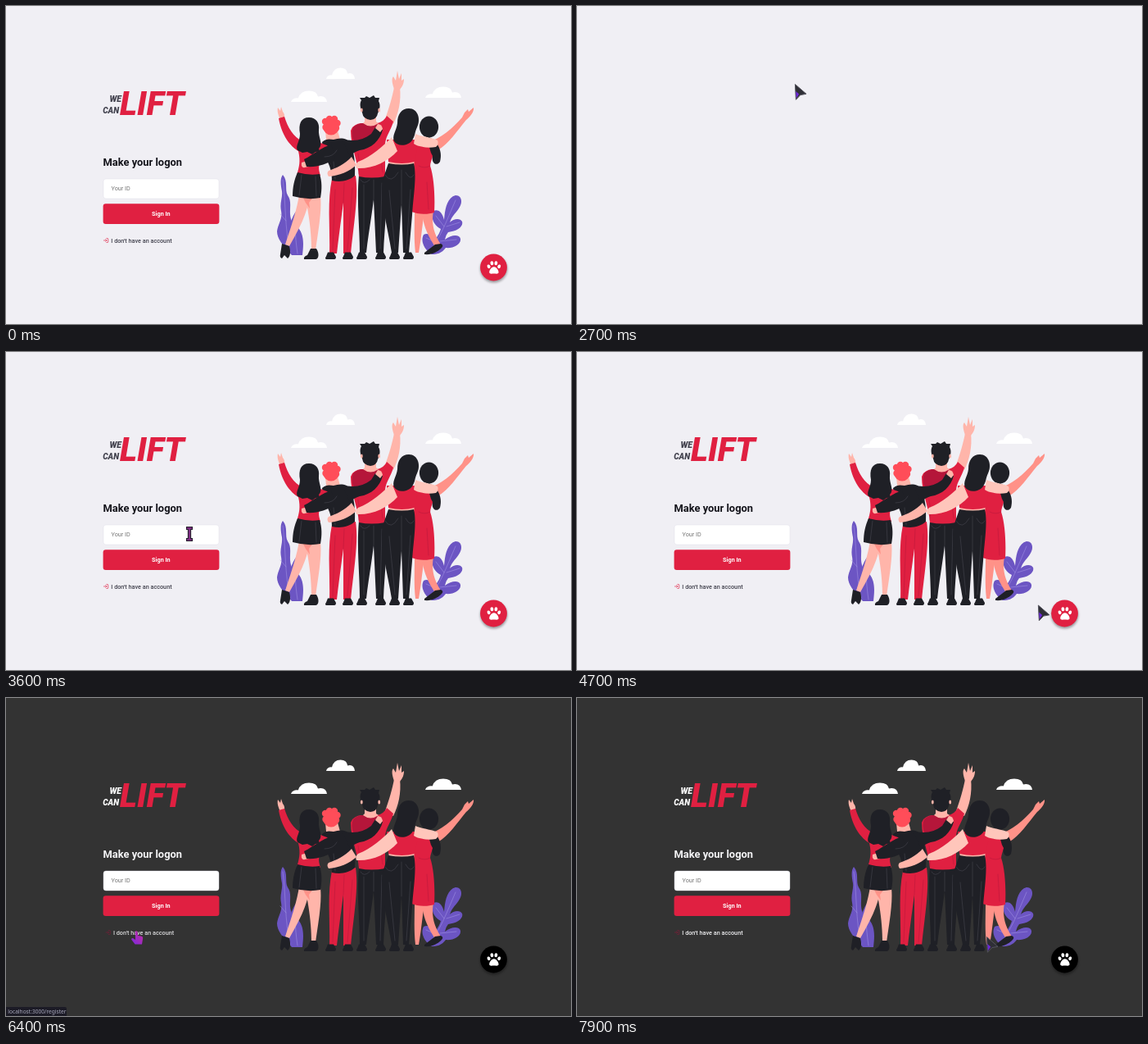
Write an HTML page that moves like this. It is 690 px wide and 388 px high and loops after 8 s.

```html
<!DOCTYPE html>
<html lang="en">
<head>
<meta charset="utf-8">
<title>Logon</title>
<style>
html, body { margin: 0; width: 100%; height: 100%; overflow: hidden; background: #f0eff4; }
svg { display: block; width: 690px; height: 388px; font-family: Roboto, "Open Sans", sans-serif; }
.bg { fill: var(--bg); }
.ink { fill: var(--ink); }
.word { fill: var(--word); }
.link { fill: var(--link); }
.icon { stroke: var(--icon); }
.paw { fill: var(--paw); }
.black { fill: #1f2026; }
.red { fill: #e02041; }
.shade { fill: #b5163a; }
.ginger { fill: #ff4d59; }
.skin { fill: #ffb5aa; }
.pale { fill: #ffc6bb; }
.tan { fill: #ff9288; }
.leaf { fill: #6c55c3; }
.white { fill: #fff; }
.line { fill: none; stroke-width: .5; stroke-linecap: round; }
</style>
</head>
<body>
<svg id="stage" viewBox="0 0 690 388">
  <defs>
    <linearGradient id="glow" x1="0" y1="1" x2="1" y2="0">
      <stop offset="0" stop-color="#7a2be0"/><stop offset="1" stop-color="#c92a9c"/>
    </linearGradient>
    <filter id="soft" x="-30%" y="-30%" width="160%" height="160%"><feGaussianBlur stdDeviation="1.8"/></filter>
  </defs>
  <rect class="bg" width="690" height="388"/>

  <g id="form">
    <g font-weight="900" font-style="italic">
      <text class="word" x="141" y="117" font-size="10.5" text-anchor="end">WE</text>
      <text class="word" x="138" y="131" font-size="10" text-anchor="end">CAN</text>
      <text class="red" x="139" y="133" font-size="40">LIFT</text>
    </g>
    <text class="ink" x="118.5" y="194.5" font-size="12.9" font-weight="700">Make your logon</text>
    <rect class="white" x="119" y="211" width="141" height="24" rx="3" stroke="#dcdce6" stroke-width=".4"/>
    <text x="128.6" y="225.3" font-size="7.25" fill="#757575">Your ID</text>
    <rect id="button" x="118.6" y="241.2" width="141.8" height="24.7" rx="3.2"/>
    <text class="white" x="189.4" y="256.2" font-size="7.25" font-weight="700" text-anchor="middle">Sign In</text>
    <g id="link">
      <path class="line icon" style="stroke-width:.65" d="M119.4 286H122.9M121.7 284.7L123 286L121.7 287.3M122.8 283.5H124Q124.7 283.5 124.7 284.2V287.8Q124.7 288.5 124 288.5H122.8"/>
      <text class="link" x="128.3" y="288.6" font-size="7.25" font-weight="500">I don't have an account</text>
    </g>
  </g>

  <g id="crowd"></g>

  <g id="pawButton">
    <circle cx="595.7" cy="321" r="16.6" opacity=".36" filter="url(#soft)"/>
    <circle class="paw" cx="595.5" cy="319" r="16.4"/>
    <g class="white">
      <ellipse cx="589.6" cy="317.8" rx="1.9" ry="2.4" transform="rotate(-22 589.6 317.8)"/>
      <ellipse cx="593.4" cy="313.8" rx="1.9" ry="2.5" transform="rotate(-8 593.4 313.8)"/>
      <ellipse cx="598.4" cy="313.8" rx="1.9" ry="2.5" transform="rotate(8 598.4 313.8)"/>
      <ellipse cx="602.2" cy="317.8" rx="1.9" ry="2.4" transform="rotate(22 602.2 317.8)"/>
      <path d="M595.9 318.2C599 318.2 601.7 322.4 601.6 324.8C601.5 327.4 598.5 326.6 595.9 326.5C593.3 326.6 590.3 327.4 590.2 324.8C590.1 322.4 592.8 318.2 595.9 318.2Z"/>
    </g>
  </g>

  <g id="status">
    <path d="M0 377H72Q74 377 74 379V388H0Z" fill="#1c1b26"/>
    <text x="2.3" y="385" font-size="6.6" fill="#a9a9bd" font-family="'Noto Sans', sans-serif">localhost:3000/register</text>
  </g>

  <g id="cursor">
    <g id="arrow">
      <path d="M.4 .5L14 12.3L6.8 13.6L1.4 19.3Z" fill="#2f2f36" stroke="#55555e" stroke-width="1" stroke-linejoin="round"/>
      <path d="M1.2 9L5.2 12.6L1.9 17.6Z" fill="#6d28d9"/>
    </g>
    <path id="beam" d="M-3.5-8.5H3.5V-5.5H1.6V5.5H3.5V8.5H-3.5V5.5H-1.6V-5.5H-3.5Z" fill="#7c2c80" stroke="#27202f" stroke-width="1.1"/>
    <path id="hand" d="M-1.2 .6C-1 -.6 1.1 -.6 1.4 .6L2.2 5.5L5.8 6C7.8 6.3 8.4 7.6 8.1 9.2L7 16H-1.4L-5.6 10.6C-6.6 9.2 -5 7.8 -3.6 8.8L-1 10.6Z" fill="url(#glow)"/>
  </g>
</svg>
<script>
const LOOP = 8000, STEP = 100;
const $ = id => document.getElementById(id);

const shape = (cls, d) => `<path class="${cls}" d="${d}"/>`;
const dot = (cls, x, y, rx, ry = rx) => `<ellipse class="${cls}" cx="${x}" cy="${y}" rx="${rx}" ry="${ry}"/>`;
const line = (color, d) => `<path class="line" stroke="${color}" d="${d}"/>`;
const shoe = (x, w = 13) =>
  shape('black', `M${x + 3} 300.5H${x + w - 3}L${x + w} 306Q${x + w} 309 ${x + w - 2} 309H${x + 1}Q${x - 1} 308 ${x + 1} 305.5Z`);
const cloud = (x, y, w) =>
  shape('white', `M${x} ${y}q${w * .04} -5 ${w * .2} -4.6q${w * .06} -9 ${w * .3} -9q${w * .22} 0 ${w * .25} 7q${w * .22} -2 ${w * .25} 6.6Z`);

const VEIN = '#a99be8', STITCH = '#4c4d57', FOLD = '#b5163a';

const plants = [
  shape('leaf', 'M347 301C338 292 331 284 331 275C332 266 338 260 336 250C334 240 338 234 337 226C335 216 335 210 338 206C345 214 340 224 344 231C350 239 345 249 348 260C354 273 350 288 349 301Z'),
  shape('leaf', 'M349 304C341 296 340 287 347 280C349 270 346 265 350 258Q353 251 356 249C360 256 354 262 357 271C365 280 363 294 362 304Z'),
  line(VEIN, 'M338 212C342 240 340 270 347 300M355 255C352 272 354 288 356 302M335 254L342 262M350 264L353 270'),
  shape('leaf', 'M520 303C510 297 506 286 510 279C515 276 521 280 525 284C528 279 530 276 531 272C523 268 518 259 522 250C529 247 533 253 535 261C536 249 538 234 549 231C557 231 558 240 553 247C549 253 544 257 542 264C547 259 555 259 557 263C559 269 551 275 540 276C537 280 537 282 536 285C545 278 554 279 555 284C556 291 546 296 537 295C532 302 526 303 520 303Z'),
  line(VEIN, 'M515 302C530 285 538 262 549 237M535 269L525 256M538 269L554 264M527 289L513 283M530 287L550 285')
];

const rightWoman = [
  shape('tan', 'M499 250L511 251C508 270 507 285 504 301H500C498 284 499 268 499 250Z'),
  shape('tan', 'M508 250L522 250C519 266 523 279 531 291L525 295C516 282 509 268 508 250Z'),
  shape('black', 'M511 301L524 291L531 290Q535 292 532 295C527 300 520 304 511 303Z'),
  shape('tan', 'M516 166C530 162 546 149 557 136L560 130L564 126L565 129L571 124C572 129 566 136 562 139C551 152 541 168 527 176Z'),
  shape('red', 'M500 160C512 162 520 163 524 168C525 178 519 186 518 195C523 210 524 234 523 252C514 255 503 254 495 251L496 190Z'),
  shape('black', 'M516 160C526 164 534 176 530 190C526 196 519 192 521 183Q516 175 516 160Z'),
  dot('black', 516.5, 147.5, 11.6, 13),
  line(FOLD, 'M518 195Q511 199 504 195M514 215L516 248')
];

const leftWoman = [
  shape('skin', 'M358 230L371 232C368 253 358 272 346 293L341 291C347 272 355 251 358 230Z'),
  shape('skin', 'M365 231L384 232C386 250 381 276 378 298H373C373 280 371 259 365 231Z'),
  shape('tan', 'M362 232H376L370 240L371 247Q365 240 362 232Z'),
  shape('black', 'M337 290L346 293C348 300 347 306 344 308L340 304L337 308Q334 307 335 303Z'),
  shape('black', 'M372 296L379 296C383 302 382 309 378 309H364Q363 306 368 304Z'),
  shape('skin', 'M335 139C332 132 331 128 332 124L335 128L336 123L338 129C341 132 340 136 340 138Z'),
  shape('red', 'M333 137L340 135C344 148 351 160 362 165L367 181C350 177 337 160 333 137Z'),
  shape('red', 'M356 164L387 168L384 190C381 196 382 200 384 207H355C358 196 360 190 357 177Z'),
  shape('black', 'M356 203Q370 207 383 205C386 214 386 224 384 234Q368 237 350 232C350 221 352 212 356 203Z'),
  line(STITCH, 'M361 206L358 231M378 208L379 232'),
];

const leftHair = shape('black', 'M370 136C379 136 383 143 382 151C381 160 388 168 382 174Q384 178 378 178L374 181L368 178L362 179L356 176C353 171 359 165 359 156C357 144 360 136 370 136Z');

const redhead = [
  shape('red', 'M398 211L427 207C431 232 424 270 421 302H412L412 240C409 262 406 284 404 302H395C396 272 392 240 398 211Z'),
  line(FOLD, 'M412 240L413 216M402 224L399 298M423 222L417 298'),
  shoe(390), shoe(411),
  shape('skin', 'M390 152H405L408 163Q398 167 391 163Z'),
  shape('black', 'M386 166C392 161 396 163 400 163C405 162 409 160 416 163C424 170 427 186 426 207C418 214 408 215 398 213C398 200 394 190 388 183Z'),
  shape('red', 'M381 166L392 170Q397 173 394 178L381 181Z'),
  shape('skin', 'M368 189L361 191Q360 198 365 197L369 196Z'),
  leftHair,
  shape('black', 'M397 169C386 172 376 181 364 187L367 196C380 197 392 193 402 186Z'),
  line(STITCH, 'M389 184Q400 184 404 176M400 190L402 211')
];
[[390, 141], [395, 138], [401, 138], [404.5, 143], [403, 149], [390.5, 148], [397, 148]]
  .forEach(([x, y], i) => redhead.push(dot('ginger', x, y, i === 6 ? 9.5 : 4.2)));

const tallMan = [
  shape('black', 'M431 206H464C467 238 462 270 461 301H452L449 236C446 260 442 282 440 301H432C432 270 428 240 431 206Z'),
  line(STITCH, 'M449 236V212M437 218L437 296M459 216L457 296M433 212Q437 219 444 212'),
  shoe(428), shoe(451),
  shape('skin', 'M463 138C468 124 472 110 474 99L481 99C483 116 479 132 473 144Z'),
  shape('skin', 'M474 101C471 93 471 88 473 86L476 91L478 79L480 89L483 82L483 91L486 89C486 96 483 99 481 102Z'),
  shape('red', 'M423 148C430 142 434 143 437 143Q445 147 453 143C459 142 463 138 465 134L473 141C470 152 464 158 463 168V208Q446 211 431 208C430 190 421 172 421 152Z'),
  shape('shade', 'M424 148C430 143 434 143 437 143Q445 149 453 143L457 148C451 158 436 165 424 164Q421 155 424 148Z'),
  shape('skin', 'M438 130H452V141L455 143Q445 150 436 143L438 141Z'),
  shape('black', 'M435 130C432 123 432 118 434 115L432 112L438 112L440 110L444 112L449 109L451 112L456 112L455 116C458 121 456 127 454 131Q453 138 445 139Q436 138 435 130Z'),
  dot('skin', 434.3, 127, 1.4, 2.6), dot('skin', 455.7, 127, 1.4, 2.6),
  line(FOLD, 'M430 180Q433 192 431 205M457 180L460 203'),
  shape('skin', 'M422 184C414 193 403 198 394 201Q391 204 394 208C407 207 419 202 428 194Z'),
  shape('black', 'M410 162C424 166 436 164 446 156L451 148L460 151C457 164 446 174 432 176Q425 178 420 183Z'),
  shape('skin', 'M451 149L454 144Q459 144 460 150L457 154Z')
];

const darkHairWoman = [
  shape('skin', 'M467 186H499L498 196H468Z'),
  shape('black', 'M467 192Q484 195 498 192C502 208 497 235 496 255L492 301H485L483 242L479 301H471C466 270 456 235 460 212Z'),
  line(STITCH, 'M483 242V200M463 206Q470 218 479 203M488 203Q494 214 498 206M468 225L475 296M494 224L489 296'),
  shoe(468), shoe(485),
  shape('red', 'M465 163H502C505 172 499 182 499 190Q484 194 467 190Z'),
  shape('pale', 'M471 160C462 170 446 184 430 190Q426 193 428 198C448 199 466 190 478 177Z'),
  shape('pale', 'M500 156C508 160 520 160 527 164Q529 169 525 172C513 174 502 171 498 168Z'),
  shape('black', 'M492 125C503 125 507 138 502 148C499 154 500 158 496 164C491 171 478 172 474 165C471 158 477 152 478 143C478 132 483 125 492 125Z')
];

$('crowd').innerHTML = [
  cloud(391, 89, 35), cloud(348, 117, 44), cloud(512, 112, 44),
  ...plants, ...rightWoman, ...leftWoman, ...redhead, ...tallMan, ...darkHairWoman
].join('');

// Pointer path: time, x, y
const PATH = [
  [300, 700, 240], [600, 600, 192], [800, 350, 160], [1000, 454, 212], [1300, 454, 212],
  [1500, 398, 172], [1900, 358, 155], [2300, 358, 155], [2700, 266, 95], [3000, 283, 90],
  [3300, 272, 58], [3600, 224, 222], [3900, 190, 251], [4200, 300, 240], [4800, 584, 314],
  [5200, 584, 314], [5700, 200, 252], [6000, 159, 284.5], [6500, 159, 284.5],
  [6700, 190, 257], [7000, 403, 270], [7900, 500, 291], [8000, 500, 291]
];

// Theme colours: light, dark
const THEME = {
  bg: [[240, 239, 244], [51, 51, 51]],
  ink: [[19, 19, 26], [245, 245, 247]],
  word: [[65, 65, 77], [255, 255, 255]],
  link: [[65, 65, 77], [240, 240, 242]],
  icon: [[224, 32, 65], [133, 26, 56]],
  paw: [[224, 32, 65], [0, 0, 0]]
};

const clamp = v => Math.min(1, Math.max(0, v));
const ramp = (t, from, to) => clamp((t - from) / (to - from));
const smooth = k => k * k * (3 - 2 * k);
const lerp = (a, b, k) => a + (b - a) * k;
const show = (id, on) => $(id).setAttribute('visibility', on ? 'visible' : 'hidden');

// CSS "ease" curve, solved by bisection
function ease(p) {
  const bez = (a, b, u) => 3 * a * u * (1 - u) ** 2 + 3 * b * u * u * (1 - u) + u ** 3;
  let lo = 0, hi = 1;
  for (let i = 0; i < 24; i++) {
    const mid = (lo + hi) / 2;
    if (bez(.25, .25, mid) < p) lo = mid; else hi = mid;
  }
  return bez(.1, 1, lo);
}

function pointer(t) {
  const i = PATH.findIndex(p => p[0] > t);
  if (i < 1) return PATH[0].slice(1);
  const [a, b] = [PATH[i - 1], PATH[i]];
  const k = smooth(ramp(t, a[0], b[0]));
  return [lerp(a[1], b[1], k), lerp(a[2], b[2], k)];
}

const inside = (x, y, l, top, r, bottom) => x >= l && x <= r && y >= top && y <= bottom;

function draw(t) {
  const dark = ramp(t, 4900, 5100);
  for (const [name, [a, b]] of Object.entries(THEME)) {
    $('stage').style.setProperty('--' + name, `rgb(${a.map((v, i) => Math.round(lerp(v, b[i], dark)))})`);
  }

  const loading = t >= 2700 && t < 2800;
  const enter = t < 2700 ? 1 : ease(ramp(t, 2800, 3400));
  const shift = 20 * (1 - enter);
  $('form').setAttribute('transform', `translate(${-shift} 0)`);
  $('crowd').setAttribute('transform', `translate(${shift} 0)`);
  $('form').setAttribute('opacity', enter);
  $('crowd').setAttribute('opacity', enter);
  show('pawButton', !loading);

  const [x, y] = pointer(t);
  const onButton = inside(x, y, 119, 241, 260, 266);
  const onInput = inside(x, y, 119, 211, 260, 235);
  const onLink = inside(x, y, 119, 280, 206, 292);
  const onPaw = Math.hypot(x - 595.5, y - 319) < 16.5;
  const onHand = onButton || onLink || onPaw;
  $('cursor').setAttribute('transform', `translate(${x} ${y})`);
  show('hand', onHand);
  show('beam', onInput);
  show('arrow', !onHand && !onInput);

  $('button').setAttribute('fill', onButton ? '#ca1d3b' : '#e02041');
  const hover = ramp(t, 5900, 6100) - ramp(t, 6500, 6700);
  $('link').setAttribute('transform', `translate(${2.6 * hover} 0)`);
  $('link').setAttribute('opacity', 1 - .12 * hover);
  show('status', t >= 6200 && t < 7100);
}

function tick() {
  draw(Math.floor(performance.now() % LOOP / STEP) * STEP);
  requestAnimationFrame(tick);
}
tick();
</script>
</body>
</html>
```
